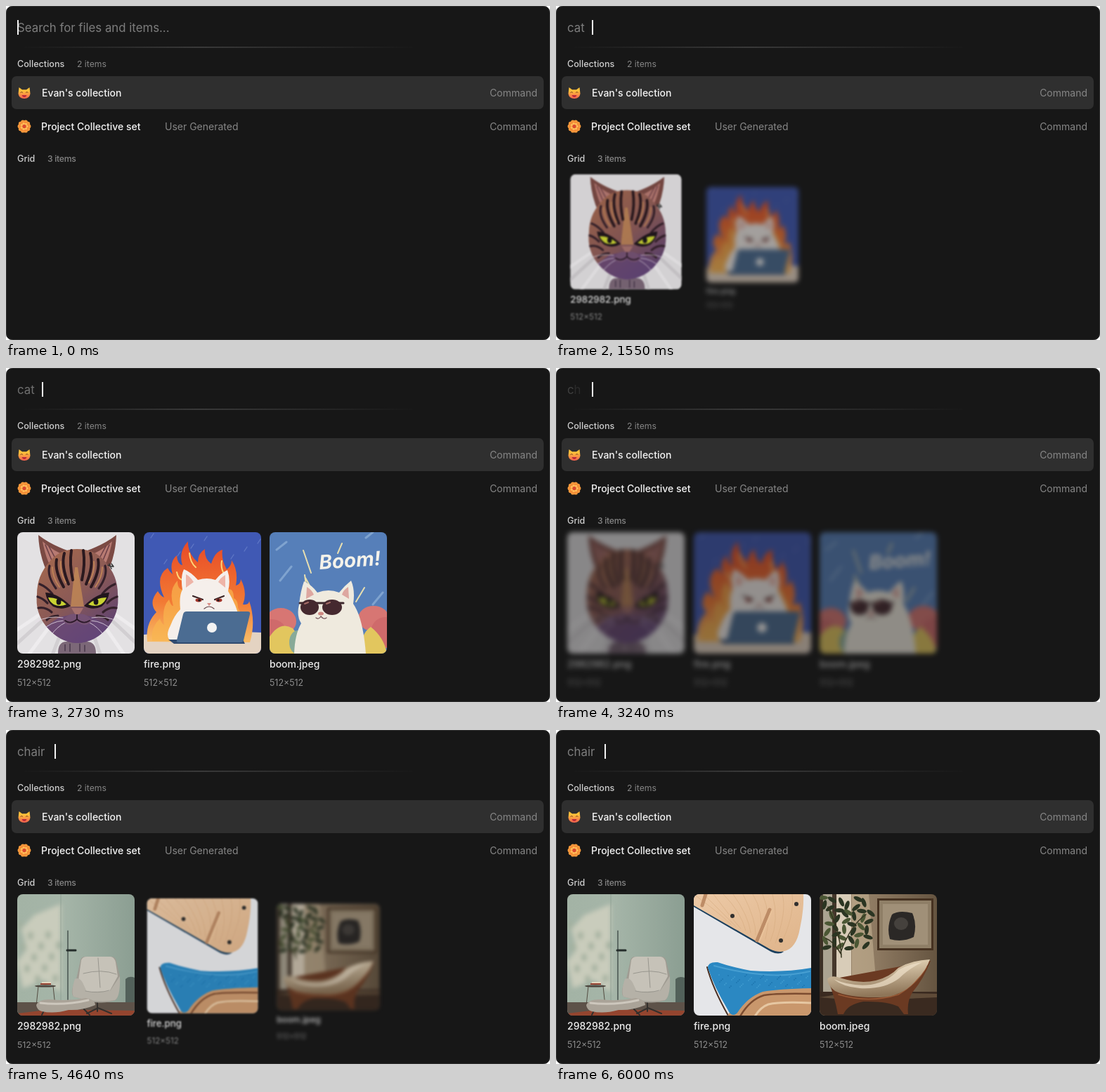
An HTML page that plays this animation: 774 by 476 pixels, repeating every 6030 ms.

```html
<!DOCTYPE html>
<html lang="en">
<head>
<meta charset="utf-8">
<title>File search</title>
<style>
  html, body { margin: 0; width: 100%; height: 100%; overflow: hidden; background: #fff; }
  svg { display: block; font-family: Inter, Roboto, sans-serif; font-size: 14px; }
  .strong { fill: #f4f4f4; font-weight: 500; }
  .dim { fill: #868686; }
  .head { fill: #cfcfcf; font-size: 12.6px; font-weight: 500; }
  .count { fill: #868686; font-size: 12.2px; }
  .name { fill: #ececec; font-weight: 500; }
  .size { fill: #8c8c8c; font-size: 12.4px; }
  .query { fill: #7d7d7d; font-size: 16.8px; white-space: pre; }
</style>
</head>
<body>
<svg id="stage" width="774" height="476" viewBox="0 0 774 476">
  <defs>
    <clipPath id="round"><rect width="167" height="173" rx="8"/></clipPath>
    <linearGradient id="rule">
      <stop offset="0" stop-color="#444" stop-opacity="0"/>
      <stop offset=".45" stop-color="#444"/>
      <stop offset="1" stop-color="#444" stop-opacity="0"/>
    </linearGradient>
    <linearGradient id="emoji" x2="0" y2="1">
      <stop offset=".3" stop-color="#ffc13a"/><stop offset="1" stop-color="#f2604f"/>
    </linearGradient>
    <linearGradient id="fur" x2=".7" y2="1">
      <stop offset="0" stop-color="#a86a4c"/><stop offset=".55" stop-color="#8b5a56"/><stop offset="1" stop-color="#5d4272"/>
    </linearGradient>
    <linearGradient id="flame" x2="0" y2="1">
      <stop offset="0" stop-color="#e84a26"/><stop offset=".6" stop-color="#f27a34"/><stop offset="1" stop-color="#f8bd68"/>
    </linearGradient>
    <linearGradient id="wall">
      <stop offset="0" stop-color="#a3b3a5"/><stop offset=".4" stop-color="#a5b5a8"/><stop offset="1" stop-color="#8b9e92"/>
    </linearGradient>
    <linearGradient id="wood" x2="1" y2="1">
      <stop offset="0" stop-color="#ecc9a6"/><stop offset="1" stop-color="#dfb48a"/>
    </linearGradient>
    <linearGradient id="room">
      <stop offset="0" stop-color="#a39176"/><stop offset=".5" stop-color="#8c7860"/><stop offset="1" stop-color="#655440"/>
    </linearGradient>
    <linearGradient id="seat" x2=".2" y2="1">
      <stop offset=".2" stop-color="#dccbae"/><stop offset="1" stop-color="#8e7558"/>
    </linearGradient>
    <filter id="soft"><feGaussianBlur stdDeviation="3"/></filter>
  </defs>

  <rect x=".5" y=".5" width="773" height="475" rx="8" fill="#171717" stroke="#303030"/>
  <rect x="20" y="58" width="565" height="1.5" fill="url(#rule)"/>
  <rect x="8" y="100" width="757" height="47" rx="7" fill="#2f2f2f"/>

  <path d="M18.5 116l4.5 3.2h6l4.5-3.2l1 9q-1 7-8.5 7t-8.5-7z" fill="url(#emoji)"/>
  <path d="M20.5 123.5q1.5-2 3.5 0m4 0q2-2 3.5 0" fill="none" stroke="#7a4420" stroke-width="1"/>
  <path d="M22.5 127h7q-1 3-3.5 3t-3.5-3z" fill="#b9283c"/>
  <g id="flower"></g>

  <text class="head" x="16" y="87">Collections</text>
  <text class="count" x="101" y="87">2 items</text>
  <text class="strong" x="51" y="129">Evan's collection</text>
  <text class="dim" x="756" y="129" text-anchor="end">Command</text>
  <text class="strong" x="50" y="177">Project Collective set</text>
  <text class="dim" x="226" y="177">User Generated</text>
  <text class="dim" x="756" y="177" text-anchor="end">Command</text>
  <text class="head" x="16" y="222">Grid</text>
  <text class="count" x="59" y="222" font-weight="500" letter-spacing="-.3">3 items</text>

  <g id="cards"></g>
  <text class="query" id="hint" x="16" y="37">Search for files and items...</text>
  <rect id="caret" y="20" width="2" height="21" fill="#f2f2f2"/>
</svg>
<script>
const $ = id => document.getElementById(id);
const LOOP = 6030, GROW = 880;

// Drawing helpers
const fill = (color, d, extra = '') => `<path d="${d}" fill="${color}" ${extra}/>`;
const line = (color, w, d) => `<path d="${d}" fill="none" stroke="${color}" stroke-width="${w}" stroke-linecap="round"/>`;
const box = (color, x, y, w, h) => `<rect x="${x}" y="${y}" width="${w}" height="${h}" fill="${color}"/>`;
const oval = (color, x, y, rx, ry = rx) => `<ellipse cx="${x}" cy="${y}" rx="${rx}" ry="${ry}" fill="${color}"/>`;
const range = (n, f) => Array.from({ length: n }, (_, i) => f(i)).join('');
const mirror = (axis, s) => s + `<g transform="translate(${2 * axis}) scale(-1 1)">${s}</g>`;
const backdrop = color => box(color, 0, 0, 167, 173);

$('flower').innerHTML = range(10, i => {
  const a = i * Math.PI / 5;
  return oval('#f79a3c', 26 + 6.5 * Math.cos(a), 171.5 + 6.5 * Math.sin(a), 2.9);
}) + oval('#f58a35', 26, 171.5, 7) + range(7, i => {
  const a = i * Math.PI / 3.5;
  return oval('#ffbd59', 26 + 4 * Math.cos(a), 171.5 + 4 * Math.sin(a), 1.7);
}) + oval('#d9482f', 26, 171.5, 2.6);

const tabby = () => backdrop('#e3e1e3')
  + range(9, i => line(i % 2 ? '#d2cfd2' : '#eeecee', 5, `M${50 + i * 9} 105L${i * 36 - 60} 180`))
  + fill('#7c6878', 'M58 173q0-18 13-17q7-4 14 2q8-6 14-2q13 0 13 17z')
  + line('#3b2a40', 1.2, 'M68 160v9m7-10v11m14-11v11m7-9v9')
  + mirror(85.5, fill('#7b4a44', 'M30 4Q31 32 42 56L74 27Q48 18 30 4z')
    + fill('#b77a72', 'M36 13Q40 34 46 46L63 31Q46 23 36 13z')
    + line('#6a3e46', 1.5, 'M40 18l9 22m-4-20l8 15'))
  + fill('url(#fur)', 'M85 24Q60 24 46 42Q28 62 28 88Q25 114 41 134Q60 157 85 158Q112 157 130 134Q146 114 143 88Q143 62 125 42Q111 24 85 24z')
  + fill('#65467a', 'M41 134Q60 157 85 158Q112 157 130 134L108 121L85 116L60 121z', 'opacity=".75"')
  + fill('#c38a56', 'M82 50l4 0l9 56h-19z', 'opacity=".8"')
  + mirror(85.5, line('#2b191f', 4, 'M77 26Q74 46 79 68M67 30Q62 48 73 74M56 39Q53 55 66 78')
    + line('#34202a', 3.2, 'M46 48Q42 62 55 80M32 74Q42 78 50 88M29 92Q36 94 43 101M30 108Q40 106 49 114M42 125Q48 119 58 119')
    + line('#bd8156', 2, 'M62 42Q60 56 69 72M50 50Q50 64 60 78')
    + fill('#21161c', 'M40 86Q58 87 76 105Q64 112 51 106Q42 99 40 86z')
    + fill('#c9d332', 'M44 93Q59 93 70 103Q60 107 52 103Q46 99 44 93z')
    + oval('#191518', 59, 99, 3.4, 4.5)
    + line('#e7dde8', .8, 'M65 122Q45 118 26 128M66 126Q48 127 34 141M68 129Q56 135 48 147'))
  + fill('#a6706d', 'M77 108h17l-6 10h-5z')
  + fill('#755274', 'M85 117Q72 114 65 126Q72 137 85 128Q99 137 106 126Q99 114 85 117z')
  + line('#2b1928', 1.8, 'M85 118v6Q76 132 68 126M85 124Q94 132 103 126')
  + line('#333', 1.5, 'M129 47l7 2m-5-4l3 7m0-7l3 4');

const blaze = () => backdrop('#4059b4')
  + range(9, i => line('#617ac7', 1.2, `M${10 + i * 19} ${8 + i * 37 % 48}l4 -6`))
  + fill('#e4d3c2', 'M0 146Q80 139 167 143V173H0z')
  + fill('url(#flame)', 'M5 156Q2 130 18 114Q6 100 20 84Q24 91 29 93Q15 63 34 51Q37 57 41 60Q36 42 47 33Q48 46 55 47Q49 28 63 13Q62 30 77 43Q77 30 87 24Q86 38 96 45Q101 28 112 25Q110 39 118 53Q125 48 125 40Q135 55 131 76Q138 74 138 67Q148 86 141 103Q150 104 150 98Q160 127 151 157z')
  + fill('#f9b54f', 'M12 155Q9 137 23 123Q25 130 29 132Q25 107 36 96Q39 106 42 105Q35 82 48 69Q48 82 56 82L110 78Q119 64 118 82Q128 78 128 94Q134 96 134 108Q145 125 144 155z', 'opacity=".7"')
  + line('#ffd577', 2, 'M47 57q2 10 8 11m10-38q1 13 9 20m37-9q-2 10 4 20')
  + fill('#f5efeb', 'M57 53Q66 56 77 68Q90 64 102 68Q110 58 119 54Q124 68 120 84Q132 104 137 126Q143 146 132 157H43Q28 152 38 133Q43 119 52 110Q50 90 55 82Q52 64 57 53z')
  + fill('#eeb4a7', 'M60 60Q66 63 71 71L60 79zM116 61Q109 65 106 71L116 79z')
  + line('#3a2527', 2.2, 'M70 91l14 5m17 0l13-5')
  + oval('#a23329', 78, 97, 4.5, 2.4) + oval('#a23329', 107, 97, 4.5, 2.4)
  + oval('#2a1a1e', 79, 97, 1.8) + oval('#2a1a1e', 106, 97, 1.8)
  + fill('#d88c84', 'M90 101h6l-3 4z') + line('#65464b', 1.2, 'M86 109q7-6 14 0')
  + fill('#314b70', 'M35 153h106l3 6H43z')
  + fill('#4b6c92', 'M61 113H148Q152 113 151 117L142 154Q141 157 138 157H49Q46 157 47 154L56 117Q57 113 61 113z')
  + oval('#f3f3f3', 97, 136, 7);

const boom = () => backdrop('#567fb9')
  + line('#7fa3cf', 3, 'M10 25l14-11m-9 55l16-20m116 54l14-17m-24-78l10-8')
  + line('#e8dfb0', 2, 'M48 26l11 32m-9 3l3 21m50-66l-6 14m38 49l-12 20m-72-34l7 13')
  + `<text x="71" y="53" transform="rotate(-4 71 53)" font-size="28" font-weight="700" font-style="italic" fill="#f4f2ea">Boom!</text>`
  + oval('#d77673', 16, 127, 22, 19) + oval('#cf6a6b', 3, 145, 22, 21)
  + oval('#d77673', 148, 123, 22, 18) + oval('#cf6a6b', 164, 143, 20, 22)
  + fill('#e2c65e', 'M0 149Q15 126 33 137Q42 146 38 173H0zM127 173Q130 144 144 135Q163 150 167 173z')
  + oval('#88aa98', 40, 157, 12, 17)
  + fill('#efeade', 'M49 70Q61 76 68 86Q84 80 99 86Q107 76 116 69Q122 83 119 102Q133 122 137 173H35Q36 145 45 130Q38 119 42 103Q44 84 49 70z')
  + fill('#dda7a0', 'M53 78q7 4 10 11l-11 6zM112 78q-7 4-9 11l10 6z')
  + line('#3c272c', 3, 'M43 101l62 0')
  + oval('#45292f', 57, 107, 13, 11) + oval('#45292f', 89, 107, 14, 11)
  + line('#a66c67', 2, 'M50 102l5-2m26 2l5-2')
  + oval('#cf8882', 73, 116, 4, 2.5) + line('#74545a', 1.3, 'M66 122q4 3 7-2q4 5 8 2');

const lounge = () => backdrop('url(#wall)')
  + `<g filter="url(#soft)">` + fill('#d6d4c3', 'M6 50L24 30L62 14V140L38 122L8 134L0 96L14 78z', 'opacity=".75"')
  + range(12, i => oval('#a3b09f', 4 + i * 5, 44 + i * 31 % 78, 4, 6)) + '</g>'
  + line('#8c9d91', .8, 'M62 0V155')
  + box('#5d5249', 0, 154, 167, 19) + fill('#94452f', 'M0 170L50 164L167 166V173H0z')
  + fill('#52615a', 'M154 121q5-5 13-2v35h-13z')
  + line('#303a37', 1.2, 'M72 52V157M68 158h10') + line('#252d2b', 3, 'M71 80h12')
  + oval('#4c463f', 40, 131, 15, 1.6) + line('#534b40', 1, 'M30 131l-3 28m24-28l3 28')
  + box('#923e2e', 33, 127, 15, 2) + box('#e3d5bd', 35, 125, 13, 2)
  + line('#332f2c', 2, 'M114 150v17m-15 3l16-8l19 8M39 164l-4 8m60-8l8 8')
  + fill('#9f9b92', 'M90 94Q91 89 97 89H134Q140 89 141 96L146 116Q146 145 140 151Q126 156 111 154L80 146Q74 139 84 121z')
  + fill('#c6c2b8', 'M91 94Q93 89 99 89H132Q138 89 140 97L143 117L131 139L96 139L87 123z')
  + fill('#b5b1a7', 'M82 121q7-4 12 7l5 11l33-1l14-21q1 29-7 34q-25 5-59-5q-4-7 2-25z')
  + line('#98968e', 1, 'M94 113q26-7 47 1M97 138q18 4 34-1M115 91l3 42')
  + fill('#aaa398', 'M27 158Q31 149 48 150Q71 153 97 148Q111 150 111 158Q92 166 73 165Q52 171 35 167Q28 165 27 158z')
  + line('#cdc7bd', 3, 'M33 155q33 4 68-4');

const plywood = () => backdrop('#e5e6e9')
  + fill('#1c405e', 'M0 18L110 82Q121 87 128 82L121 78L0 10z')
  + fill('url(#wood)', 'M0 0H156Q157 22 151 49Q146 77 129 81Q120 84 108 78L0 16z')
  + range(11, i => line('#d6ab80', .6, `M${i * 14} 0Q${34 + i * 11} ${25 + i % 3 * 6} ${53 + i * 7} ${43 + i * 3}`))
  + line('#bd8c66', 5, 'M108 22L90 66M17 0L12 16') + line('#e9c299', 2, 'M111 24L93 68')
  + oval('#31302f', 55, 31, 3) + oval('#31302f', 146, 14, 3) + oval('#31302f', 124, 66, 3)
  + line('#4a3023', 2, 'M19 104Q27 134 49 173')
  + fill('#c9976c', 'M48 173L66 146L98 136L167 133V173z')
  + line('#7c4c30', 2.5, 'M167 142Q118 141 100 144Q80 150 66 174')
  + line('#e6c7a2', 3, 'M167 155Q122 153 106 157Q95 161 87 174')
  + fill('#2b88c2', 'M20 105Q20 96 34 97Q54 104 81 109Q128 112 167 105V134Q120 135 98 139Q76 147 62 169Q54 177 48 164Q29 132 20 105z')
  + line('#479fd2', 2, 'M29 102Q70 113 105 115Q135 117 165 110')
  + range(60, i => oval(i % 2 ? '#1d75af' : '#3f9bd0', 36 + i * 29 % 128, 115 + i * 7 % 19, .9));

const study = () => backdrop('url(#room)')
  + box('#aba391', 0, 0, 45, 142) + box('#d8ccb8', 24, 0, 21, 138) + box('#3d3126', 0, 0, 5, 150) + box('#45372b', 18, 0, 6, 146)
  + fill('#cfbc9c', 'M46 0H70L80 120L46 132z', 'opacity=".5"')
  + box('#3a2a20', 0, 139, 167, 34) + fill('#5f4b38', 'M0 147L50 139L167 142V147L60 152z')
  + range(40, i => {
    const x = 5 + i * 31 % 69, y = 5 + i * 23 % 73;
    return `<g transform="rotate(${i * 47 % 180} ${x} ${y})">${oval(i % 3 ? '#2b3522' : '#4b5734', x, y, 7, 3)}</g>`;
  })
  + line('#35341f', 1.5, 'M31 90Q30 56 12 18M30 83Q44 44 66 29M31 86Q20 67 9 63')
  + box('#463221', 82, 6, 80, 74) + box('#8f7f67', 85, 9, 74, 68)
  + box('#a09078', 90, 14, 64, 58)
  + fill('#2b2826', 'M103 29Q113 22 132 27Q139 43 134 61Q118 69 100 64Q95 47 103 29z')
  + oval('#45413d', 116, 42, 10, 9)
  + fill('#6b3a22', 'M12 122Q22 148 26 171H34Q40 157 62 153Q95 152 112 160L120 171H126Q124 153 132 140Q148 121 158 95Z')
  + line('#9a5a36', 1.5, 'M27 143Q70 156 112 143Q138 128 152 104')
  + fill('url(#seat)', 'M11 121Q17 114 32 120Q58 128 80 123Q100 118 112 105Q132 94 157 93Q152 108 138 122Q118 146 86 147Q42 148 22 138Q12 131 11 121z')
  + fill('#efe2ca', 'M20 121Q45 132 73 129Q97 125 112 108Q128 99 146 97Q126 107 113 120Q92 136 57 134Q33 132 20 121z', 'opacity=".7"');

// Cards: column, start of entrance, picture
const names = ['2982982.png', 'fire.png', 'boom.jpeg'];
const lefts = [16, 196, 375];
const sets = [
  { starts: [1115, 1385, 1655], art: [tabby, blaze, boom], leave: [2900, 3640] },
  { starts: [3820, 4211, 4354], art: [lounge, plywood, study], leave: [LOOP, LOOP + 1] }
];
const cards = sets.flatMap(({ starts, art, leave }) => art.map((draw, i) => {
  const g = document.createElementNS('http://www.w3.org/2000/svg', 'g');
  g.innerHTML = `<g transform="translate(${lefts[i]} 234)"><g clip-path="url(#round)">${draw()}</g></g>
    <text class="name" x="${lefts[i]}" y="427">${names[i]}</text>
    <text class="size" x="${lefts[i]}" y="453">512×512</text>`;
  $('cards').append(g);
  return { g, start: starts[i], leave, mid: lefts[i] + 83.5 };
}));

// Typed words: each letter fades in on its own
const words = [['cat', 620, 2680], ['chair', 3080, LOOP]].map(([word, start, end]) => {
  const text = $('hint').cloneNode();
  text.removeAttribute('id');
  text.innerHTML = [...word].map(c => `<tspan>${c}</tspan>`).join('');
  $('stage').append(text);
  return { text, start, end };
});

const ramp = (t, a, b) => Math.min(1, Math.max(0, (t - a) / (b - a)));
const easeOut = u => 1 - (1 - u) ** 3;
const smooth = u => u * u * (3 - 2 * u);

function draw(t) {
  $('hint').style.opacity = 1 - smooth(ramp(t, 60, 560));
  const caret = 16 + 35 * easeOut(ramp(t, 560, 1320)) + 18 * easeOut(ramp(t, 3500, 4200));
  $('caret').setAttribute('x', caret);

  for (const { text, start, end } of words) {
    text.style.opacity = 1 - ramp(t, end, end + 380);
    [...text.children].forEach((c, i) => {
      const from = start + i * 80;
      c.setAttribute('fill-opacity', ramp(t, from, from + 400));
    });
  }

  for (const { g, start, leave, mid } of cards) {
    const p = easeOut(ramp(t, start, start + GROW));
    const out = smooth(ramp(t, ...leave));
    const blur = 9 * (1 - p) + 8 * out;
    g.style.display = p > 0 && out < 1 ? '' : 'none';
    g.style.opacity = p ** .6 * (1 - out);
    g.style.filter = blur > .05 ? `blur(${blur}px)` : 'none';
    g.setAttribute('transform', `translate(${mid} 346) scale(${.6 + .4 * p}) translate(${-mid} -346)`);
  }
}

function tick() {
  draw(performance.now() % LOOP);
  requestAnimationFrame(tick);
}
tick();
</script>
</body>
</html>
```
